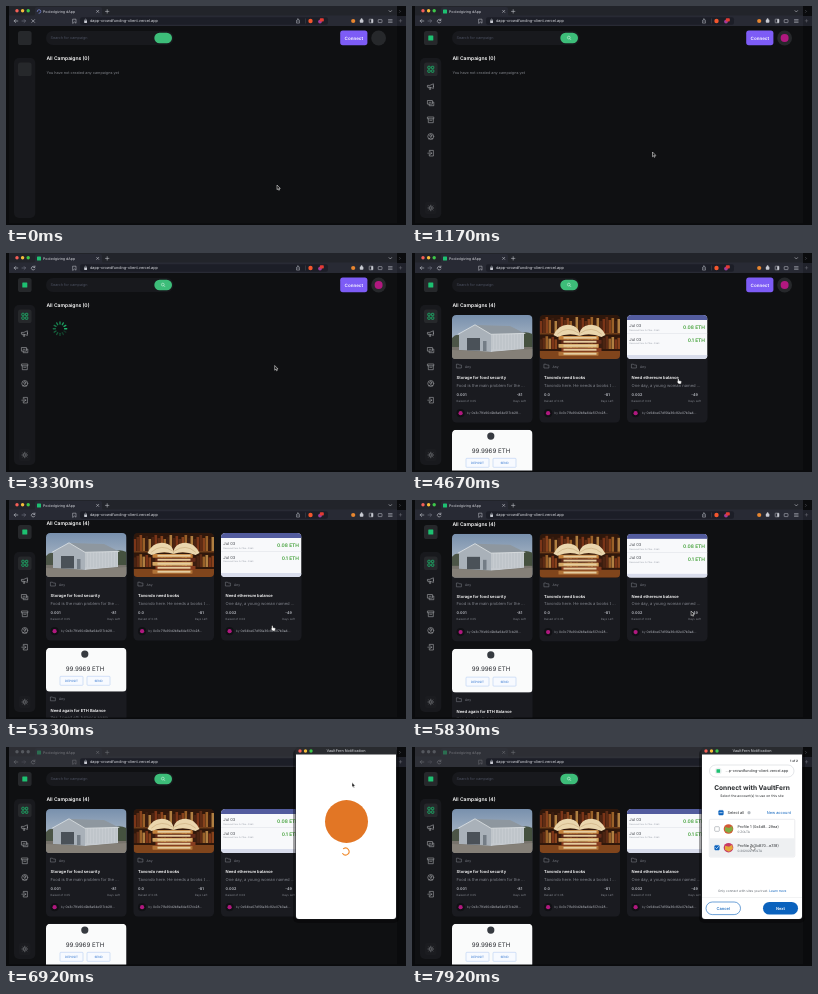
An HTML page that plays this animation: 400x219 px, repeating every 8000 ms.

```html
<!DOCTYPE html>
<html lang="en">
<head>
<meta charset="utf-8">
<title>Campaign dashboard</title>
<style>
  html, body { margin: 0; width: 100%; height: 100%; overflow: hidden; background: #08090b; }
  svg { display: block; width: 100%; height: 100%; }
  text { font-family: Inter, "Open Sans", sans-serif; white-space: pre; text-rendering: geometricPrecision; }
</style>
</head>
<body>
<svg id="stage" viewBox="0 0 400 219"></svg>
<script>
const LOOP = 8000;
const ICONS_AT = 520, LOADER_AT = 1720, CARDS_AT = 4560, POPUP_AT = 6710, ACCOUNTS_AT = 7560;
const GREEN = '#1dc071', PINK = '#b0187f', BLUE = '#0b62bd';

// Markup helpers; text is placed by its vertical centre.
const text = (x, y, size, str, fill = '#fff', weight = 400, anchor = 'start') =>
  `<text x="${x}" y="${y + size * 0.36}" font-size="${size}" fill="${fill}" font-weight="${weight}" text-anchor="${anchor}">${str}</text>`;
const rect = (x, y, w, h, fill, r = 0, extra = '') =>
  `<rect x="${x}" y="${y}" width="${w}" height="${h}" rx="${r}" fill="${fill}" ${extra}/>`;
const dot = (x, y, r, fill, extra = '') => `<circle cx="${x}" cy="${y}" r="${r}" fill="${fill}" ${extra}/>`;
const line = (d, stroke, w = 0.6, extra = '') =>
  `<path d="${d}" fill="none" stroke="${stroke}" stroke-width="${w}" stroke-linecap="round" stroke-linejoin="round" ${extra}/>`;
const shape = (d, fill) => `<path d="${d}" fill="${fill}"/>`;
const group = (id, body, extra = '') => `<g id="${id}" ${extra}>${body}</g>`;
const at = (x, y, body) => `<g transform="translate(${x} ${y})">${body}</g>`;

function browserBar() {
  const lights = colors => colors.map((c, i) => dot(11 + i * 5.6, 4.8, 1.7, c)).join('');
  const pale = '#c8cad2', toolbar = '#282a34';
  return rect(3, 0, 388, 10, '#22242a') + rect(3, 9.5, 388, 10.5, toolbar) +
    shape('M27 10Q29 10 29 8V3Q29 1 31 1H94Q96 1 96 3V8Q96 10 98 10Z', toolbar) +
    group('lightsOn', lights(['#f45f57', '#f6bd3b', '#3dc84a'])) +
    group('tabSpinner', line('M31.2 5.5A1.8 1.8 0 1 1 33 7.3', '#8d9eff')) +
    group('favicon', rect(31, 3.5, 4, 4, GREEN, 0.6)) +
    text(37, 5.5, 3.6, 'Pooledgiving dApp', '#d9dae0') +
    line('M90.6 4.3l2.2 2.2m0-2.2l-2.2 2.2M99.5 5.4h3.4m-1.7-1.7v3.4M383 4.6l1.3 1.4 1.3-1.4', pale, 0.55) +
    line('M11.8 15H8.2m1.5-1.5L8.2 15l1.5 1.5', pale) +
    line('M16 15h3.6m-1.5-1.5l1.5 1.5-1.5 1.5', '#777a86') +
    group('stop', line('M25.8 13.6l2.8 2.8m0-2.8l-2.8 2.8', pale)) +
    group('reload', line('M28.7 14.2A1.8 1.8 0 1 0 28.8 16M28.9 13v1.4h-1.4', pale)) +
    line('M67 13.2h3v4l-1.5-1.2-1.5 1.2Z', pale, 0.5) +
    group('unfocused', rect(3, 0, 388, 20, '#34363b', 0, 'opacity=".6"') + lights(['#55585e', '#55585e', '#55585e'])) +
    rect(74, 11.2, 248, 7.6, '#1c1e27', 2) +
    rect(78.2, 14.5, 2.8, 2.4, pale, 0.3) + line('M78.8 14.5v-.6a.8.8 0 0 1 1.6 0v.6', pale, 0.45) +
    text(84, 15, 3.85, 'dapp-crowdfunding-client.vercel.app', '#dfe0e6') +
    line('M290.5 14.5v2.6h3v-2.6M292 16v-3.2m-1 1l1-1 1 1', pale, 0.45) +
    rect(299, 12.5, 0.4, 5, '#555864') +
    dot(304.5, 15, 2.2, '#f4562e') + dot(314, 15.6, 1.9, '#a13a9c') + rect(313.8, 12.3, 4, 3.3, '#e33b35', 0.8) +
    dot(347.2, 15, 2.1, '#e8862f') + rect(353.8, 13.6, 3.6, 3.2, pale, 0.8) + dot(355.6, 13.2, 0.9, pale) +
    rect(363.2, 13.2, 3.8, 3.6, 'none', 0.4, `stroke="${pale}" stroke-width=".5"`) + rect(365.2, 13.2, 1.8, 3.6, pale) +
    rect(372.2, 13.6, 3.8, 3, 'none', 0.4, `stroke="${pale}" stroke-width=".5"`) +
    line('M382.5 13.6h3.6m-3.6 1.4h3.6m-3.6 1.4h3.6', pale, 0.5) +
    line('M393.5 4.4l1 1-1 1M393.2 14.8h2.6m-1.3-1.3v2.6', '#70727c', 0.45);
}

function sidebar() {
  const gray = '#a4a6aa';
  const grid = [[-3, -3], [0.6, -3], [-3, 0.6], [0.6, 0.6]]
    .map(([x, y]) => rect(x, y, 2.4, 2.4, 'none', 0.5, `stroke="${GREEN}" stroke-width=".75"`)).join('');
  const icons = [
    'M-3-1H-1L2.6-2.6V2L-1 .8H-3ZM-1.8 1l.5 2h1.2L-.6 1M2.6-.8q1.2.4 0 1.2',
    'M-3-2.6H1.6V1H-3ZM-1.6 1V2.6H3V-1H1.6M-1.6-.8H.2',
    'M-3-2.8H3V-1H-3ZM-2.5-1V2.9H2.5V-1M-1 .5H1',
    'M3 0A3 3 0 1 1-3 0A3 3 0 1 1 3 0M1.1-.8A1.1 1.1 0 1 1-1.1-.8A1.1 1.1 0 1 1 1.1-.8M-1.9 2.2Q0 .2 1.9 2.2',
    'M-1.5-1.2V-2.8H2.6V2.8H-1.5V1.2M-3 0H1M-.2-1.2L1 0-.2 1.2'
  ];
  const rays = Array.from({ length: 8 }, (_, i) =>
    line('M0-2.2V-2.8', gray, 0.5, `transform="rotate(${i * 45})"`)).join('');
  return rect(12, 25, 13.6, 14, '#26282b', 2.6) + rect(8, 52, 21.3, 160, '#18191d', 5) +
    rect(12, 56.5, 13.6, 13.6, '#26282b', 2.6) +
    group('sideIcons', rect(16.3, 29.5, 5, 5, GREEN, 0.6) + at(18.8, 63.3, grid) +
      icons.map((d, i) => at(18.8, 80.4 + i * 16.7, line(d, gray, 0.6))).join('') +
      rect(13, 196, 11.5, 12, '#1b1c20', 2.5) +
      at(18.8, 202, rays + dot(0, 0, 1.3, 'none', `stroke="${gray}" stroke-width=".5"`)));
}

function header() {
  return rect(40, 25, 127.5, 14, '#18191d', 7) + text(44.5, 32, 3.75, 'Search for campaign', '#4b5060') +
    rect(148.3, 26.7, 17.7, 10.6, '#3dbd79', 5.3) +
    group('searchIcon', dot(156.8, 31.6, 1.4, 'none', 'stroke="#d8f5e6" stroke-width=".55"') + line('M157.9 32.7l.9.9', '#d8f5e6', 0.55)) +
    rect(334.2, 24.6, 27.2, 14.6, '#7d5cf6', 2.6) + text(347.8, 32, 4.5, 'Connect', '#fff', 600, 'middle') +
    dot(372.6, 32, 7.4, '#26282b') + group('avatar', dot(372.6, 32, 4, PINK)) +
    group('title', text(40.4, 52.6, 5, '', '#fff', 600));
}

// Card pictures, each 80.5 by 44.
function warehouse() {
  let ribs = '';
  for (let x = 40; x < 71; x += 3) ribs += `M${x} ${19.5 - (x - 40) * 0.03}V34`;
  return rect(0, 0, 80.5, 44, 'url(#sky)') + shape('M0 23Q5 17 11 22V35H0Z', '#4c5547') +
    shape('M66 20Q72 15 80.5 19V35H66Z', '#45513f') + rect(0, 32, 80.5, 12, '#77736c') +
    shape('M7 19L23 10 39 19V37L7 35Z', '#a9b1b9') + shape('M39 19L72 18V34L39 37Z', '#c6cbd0') +
    line(ribs, '#a3abb2', 0.35) + shape('M23 10L58 11 73 18.5 39 19.5Z', '#8e979f') +
    line('M6 19.3L23 9.8 39 19.3 73 18.4', '#e3e6e8', 0.8) +
    rect(15, 23, 13, 12.5, '#4a5158') + rect(31, 26, 3.5, 10, '#747d86') + shape('M0 35L39 37 80.5 34V44H0Z', '#858078');
}

function books() {
  const colors = ['#7b3518', '#9a6129', '#4b2412', '#87421c', '#b07f41', '#5f2c15', '#3a1d10'];
  let out = rect(0, 0, 80.5, 44, '#2f170b');
  for (let i = 0; i < 27; i++) {
    const h = 12 + (i * 7) % 5;
    out += rect(i * 3, 18 - h, 2.6, h, colors[(i * 5) % 7]) + rect(i * 3, 34 - h * 0.8, 2.6, h * 0.8, colors[(i * 3 + 2) % 7]);
  }
  out += rect(0, 18, 80.5, 1.5, '#6d3c19') + rect(0, 36, 80.5, 8, '#80451c');
  ['#c2803b', '#632a18', '#d3a663', '#873d1f', '#b17337'].forEach((c, i) =>
    out += rect(19 + (i % 2) * 3, 21 + i * 4, 40, 3.7, c, 0.6) + rect(24, 21.8 + i * 4, 33, 1.9, '#e5cda0'));
  return out + shape('M14 20Q20 8 31 10Q38 11 40 18Q42 11 49 10Q60 8 66 20L62 22Q50 17 40 21Q30 17 18 22Z', '#ead6ad') +
    line('M40 18V21M18 19Q28 10 39 18M62 19Q52 10 41 18', '#b99562', 0.4);
}

function transfers() {
  const row = (y, amount) => text(2.3, y - 1.2, 4.1, 'Jul 03', '#41444b') +
    text(2.3, y + 3, 2.2, 'Received from 0x71be...93d0', '#a3a8b2') +
    text(78, y, 4.9, amount, '#3f9f35', 600, 'end');
  return rect(0, 0, 80.5, 44, '#f8f9fb') + rect(0, 0, 80.5, 5, '#535c9e') +
    row(12, '0.08 ETH') + rect(0, 18.5, 80.5, 0.4, '#d4d7df') + row(25.3, '0.1 ETH') + rect(0, 40, 80.5, 4, '#d9ddec');
}

function balance() {
  const button = (x, label) => rect(x, 28.5, 23, 9, '#f7faff', 0.8, 'stroke="#a8c5ee" stroke-width=".5"') +
    text(x + 11.5, 33, 3, label, '#4b86d5', 500, 'middle');
  return rect(0, 0, 80.5, 44, '#fafbfb') + dot(38.8, 6.3, 3.6, '#363a40') +
    text(39, 20.5, 6.2, '99.9969 ETH', '#292c31', 400, 'middle') + button(14, 'DEPOSIT') + button(41, 'SEND');
}

function card(x, y, picture, title, about, raised, goal, days, owner) {
  const gray = '#81848c';
  return at(x, y, rect(0, 0, 80.5, 107.5, '#1a1b20', 4.5) + `<g clip-path="url(#picture)">${picture}</g>` +
    line('M4.8 49.2h1.7l.7.8h2.2v3h-4.6Z', gray, 0.5) + text(13, 51.4, 3.3, 'Any', gray) +
    text(4.6, 62.4, 4.1, title, '#fff', 600) + text(4.6, 70.1, 4.15, about + ' ...', gray) +
    text(4.6, 79.2, 3.75, raised, '#c0c3ca', 600) + text(4.6, 85.6, 2.85, 'Raised of ' + goal, gray) +
    text(67.5, 79.2, 3.75, days, '#c0c3ca', 600, 'middle') + text(67.5, 85.6, 2.85, 'Days Left', gray, 400, 'middle') +
    dot(8.6, 98.2, 4.1, '#101114') + dot(8.6, 98.2, 2.1, PINK) +
    text(14.8, 98.2, 3.25, `by <tspan fill="#b6b9c0">${owner}</tspan>`, gray));
}

function cards() {
  return card(40, 62, warehouse(), 'Storage for food security', 'Food is the main problem for the', '0.001', '0.05', '-81', '0x3c71fe90d2b8a64e517cb28...') +
    card(127.5, 62, books(), 'Tavondo need books', 'Tavondo here. He needs a books t', '0.0', '0.05', '-81', '0x3c71fe90d2b8a64e517cb28...') +
    card(215, 62, transfers(), 'Need ethereum balance', 'One day, a young woman named', '0.002', '0.03', '-49', '0x94be07d15fa36c82e07b3a4...') +
    card(40, 176.8, balance(), 'Need again for ETH Balance', 'Yes, I need eth balance again', '0.0', '0.05', '-49', '0x94be07d15fa36c82e07b3a4...');
}

function loader() {
  let spokes = '';
  for (let i = 0; i < 12; i++)
    spokes += line('M0-4.6V-6.7', GREEN, 1.35, `class="spoke" transform="rotate(${i * 30})"`);
  return at(54, 75.7, spokes);
}

function accountList() {
  const ink = '#24272a', soft = '#5d646c';
  const check = (x, y, mark) => rect(x - 2.3, y - 2.3, 4.6, 4.6, mark ? BLUE : '#fff', 0.8, `stroke="${mark ? BLUE : '#858b93'}" stroke-width=".5"`) +
    (mark ? line(mark, '#fff', 0.7, `transform="translate(${x} ${y})"`) : '');
  const account = (y, name, amount, a, b) => dot(316.5, y, 4.8, a) + shape(`M313 ${y - 2}l4 1 3-2 1 4-4 3-4-2Z`, b) +
    text(325.5, y - 2.4, 3.75, name, ink) + text(325.5, y + 3, 3.1, amount, soft);
  return text(386, 13.8, 3.1, '1 of 2', ink, 600, 'end') +
    rect(297.5, 18, 84.5, 12, '#fff', 6, 'stroke="#c9cdd2" stroke-width=".5"') +
    dot(306.3, 24, 3.6, '#f0f2f3') + rect(304.5, 22.2, 3.6, 3.6, GREEN, 0.4) +
    text(313.5, 24, 3.75, '...p-crowdfunding-client.vercel.app', ink) +
    text(340, 41, 6.6, 'Connect with VaultFern', ink, 700, 'middle') +
    text(340, 49.2, 3.4, 'Select the account(s) to use on this site', ink, 400, 'middle') +
    check(309, 65.7, 'M-1.2 0H1.2') + text(315.5, 65.7, 3.9, 'Select all', ink) +
    dot(337, 65.7, 1.6, '#b5bac0') + text(379, 65.3, 3.9, 'New account', BLUE, 400, 'end') +
    rect(297.3, 72.3, 85.5, 37.7, '#fff', 1.2, 'stroke="#d6d9dc" stroke-width=".5"') +
    group('hoverRow', rect(297.6, 91.3, 84.9, 18.4, '#eef0f2')) +
    check(305, 82, '') + account(82, 'Profile 1 (0x4d8...29ea)', '0 ZOLTA', '#d25a35', '#7fae45') +
    check(305, 100.7, 'M-1.3 0L-.4 1 1.4-1.1') + account(100.7, 'Profile 2 (0xB70...e318)', '0.202022 ZOLTA', '#c83a67', '#e4a93b') +
    text(340.3, 144.3, 3.2, `Only connect with sites you trust. <tspan fill="${BLUE}">Learn more</tspan>`, soft, 400, 'middle') +
    rect(290, 150, 100, 0.4, '#dfe1e4') +
    rect(294, 155, 34.5, 12.6, '#fff', 6.3, `stroke="${BLUE}" stroke-width=".6"`) + text(311.2, 161.3, 4, 'Cancel', BLUE, 500, 'middle') +
    rect(351, 155, 35, 12.6, BLUE, 6.3) + text(368.5, 161.3, 4, 'Next', '#fff', 600, 'middle');
}

function popup() {
  return rect(287, 2, 106, 174, '#000', 5, 'opacity=".35"') + rect(289.5, 0, 101, 172.2, '#292b2f', 3) +
    shape('M290 7.5H390V169Q390 172 387 172H293Q290 172 290 169Z', '#fff') +
    ['#f45f57', '#f6bd3b', '#3dc84a'].map((c, i) => dot(294 + i * 5.5, 4, 1.7, c)).join('') +
    text(340, 4, 3.75, 'VaultFern Notification', '#c5c7cb', 500, 'middle') +
    group('popupLoading', dot(340.5, 74.5, 21.5, '#e27625') + group('ring', line('M3.5 0A3.5 3.5 0 1 1 0-3.5', '#f08a2c', 1.1))) +
    group('accounts', accountList());
}

document.getElementById('stage').innerHTML = `
  <defs>
    <clipPath id="picture"><path d="M0 44V4.5Q0 0 4.5 0H76Q80.5 0 80.5 4.5V40Q80.5 44 76.5 44H4Q0 44 0 40Z"/></clipPath>
    <clipPath id="page"><rect x="3" y="20" width="388" height="197.5" /></clipPath>
    <linearGradient id="sky" x2="0" y2="1"><stop stop-color="#7890ad"/><stop offset="1" stop-color="#c6cdd3"/></linearGradient>
  </defs>` +
  rect(0, 0, 400, 219, '#0a0b0d') + rect(391, 10, 9, 10, '#20222b') +
  `<g clip-path="url(#page)">` + rect(3, 20, 388, 20, '#fff') +
    group('bounce', rect(3, 20, 388, 197.5, '#0f1012') +
      group('scroller', header() +
        group('empty', text(40.4, 66.3, 3.75, 'You have not created any campaigns yet', '#707379', 500)) +
        group('loader', loader()) + group('cards', cards())) +
      sidebar()) +
  '</g>' + browserBar() + group('popup', popup()) +
  group('cursor',
    group('arrow', '<path d="M0 0V4.7L1.1 3.7 1.8 5.3 2.6 4.9 1.9 3.4H3.3Z" fill="#111" stroke="#fff" stroke-width=".5"/>') +
    group('hand', '<path d="M.8 0Q1.5 0 1.5.7V2.1L3.6 2.6Q4.2 2.8 4 3.5L3.5 5.4H1.2L-.7 3.3Q-.4 2.5.2 3V.7Q.2 0 .8 0Z" fill="#fff" stroke="#111" stroke-width=".4"/>'));

const el = id => document.getElementById(id);
const show = (id, on) => el(id).setAttribute('display', on ? 'inline' : 'none');
const move = (id, value) => el(id).setAttribute('transform', value);
const spokes = [...document.querySelectorAll('.spoke')];
const titleText = el('title').firstChild;

// Eased interpolation through [time, ...values] stops.
function track(stops, t) {
  const i = stops.findIndex(s => s[0] > t);
  if (i < 0) return stops[stops.length - 1].slice(1);
  if (i === 0) return stops[0].slice(1);
  const [t0, ...from] = stops[i - 1], [t1, ...to] = stops[i];
  const k = (t - t0) / (t1 - t0), e = k * k * (3 - 2 * k);
  return from.map((v, j) => v + (to[j] - v) * e);
}

const cursorPath = [[0, 271, 179], [600, 271, 179], [1170, 240.5, 146], [1700, 256, 82], [2500, 264, 89.5],
  [3330, 268.7, 112.5], [4170, 265.5, 125.5], [5700, 265.5, 125.5], [6170, 337, 49], [6480, 346, 35.5],
  [7350, 346, 35.5], [7880, 339, 97.8]];
// Negative scroll is the elastic pull past the top edge.
const scrollPath = [[5020, 0], [5300, 29], [5800, 29], [6120, -2.4], [6190, -2.4], [6450, 0]];

function draw(t) {
  const iconsReady = t >= ICONS_AT, cardsReady = t >= CARDS_AT, popupOpen = t >= POPUP_AT;
  const listReady = t >= ACCOUNTS_AT;
  const [x, y] = track(cursorPath, t);
  const [scroll] = track(scrollPath, t);

  for (const id of ['sideIcons', 'searchIcon', 'avatar', 'favicon', 'reload']) show(id, iconsReady);
  for (const id of ['stop', 'tabSpinner']) show(id, !iconsReady);
  move('tabSpinner', `rotate(${t * 0.36} 33 5.5)`);

  show('empty', t < LOADER_AT);
  show('loader', t >= LOADER_AT && !cardsReady);
  show('cards', cardsReady);
  titleText.textContent = `All Campaigns (${cardsReady ? 4 : 0})`;
  spokes.forEach((s, i) => s.setAttribute('opacity', 0.2 + 0.8 * ((i / 12 - t / 1000 + 9) % 1)));
  move('scroller', `translate(0 ${-Math.max(0, scroll)})`);
  move('bounce', `translate(0 ${Math.max(0, -scroll)})`);

  show('popup', popupOpen);
  show('lightsOn', !popupOpen);
  show('unfocused', popupOpen);
  show('popupLoading', !listReady);
  show('accounts', listReady);
  show('hoverRow', y > 91.3);
  move('ring', `translate(339.5 104.5) rotate(${t * 0.45})`);

  const pointing = (cardsReady && t < 5800) || (listReady && y > 73);
  show('hand', pointing);
  show('arrow', !pointing);
  move('cursor', `translate(${x} ${y})`);
}

function frame() {
  draw(performance.now() % LOOP);
  requestAnimationFrame(frame);
}
frame();
</script>
</body>
</html>
```
